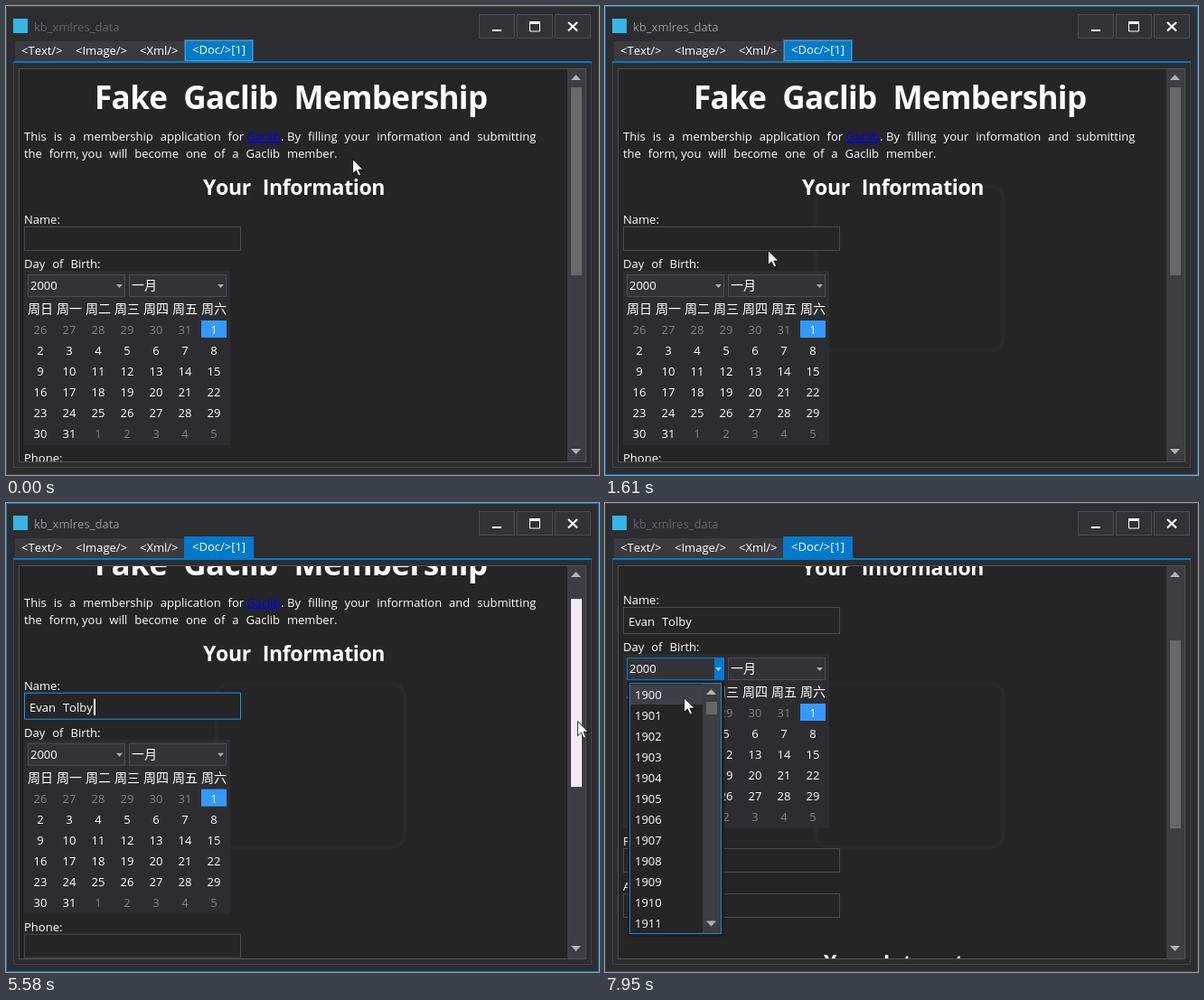
These frames come from a looping animation (656 by 519 pixels, 7990 ms). An HTML page:

```html
<!DOCTYPE html>
<html lang="en">
<head>
<meta charset="utf-8">
<title>Membership form</title>
<style>
  html, body { margin: 0; width: 100%; height: 100%; overflow: hidden; background: #2d2d30; }
  svg { display: block; color: #fff; font: 13px "Open Sans", "Noto Sans CJK SC", "Noto Sans CJK", sans-serif; font-kerning: none; }
  text { fill: #fff; }
  .live { fill: currentColor; }
  .arrow { fill: currentColor; opacity: .6; }
  .button { fill: #333337; stroke: #4c4c51; }
  .field { fill: #252526; stroke: #4c4c50; }
  .doc { word-spacing: 4.6px; }
  .h1 { font-size: 35px; font-weight: 700; letter-spacing: -.6px; word-spacing: 9.4px; }
  .h2 { font-size: 23px; font-weight: 700; letter-spacing: -.35px; word-spacing: 7.4px; }
  .link { fill: #00f; text-decoration: underline; }
  .cjk { font-family: "Noto Sans CJK SC", "Noto Sans CJK", sans-serif; font-size: 14px; }
  .mid { text-anchor: middle; }
  .other { fill: #828284; }
  .dialog text { fill: #111; }
  .thumb, .bar { fill: #686868; }
</style>
</head>
<body>
<svg width="656" height="519" viewBox="0 0 656 519">
  <defs>
    <clipPath id="view"><rect x="15" y="70" width="606" height="434"/></clipPath>
  </defs>

  <!-- window -->
  <rect width="656" height="519" fill="#2d2d30"/>
  <rect x=".5" y=".5" width="655" height="518" fill="none" stroke="#434347"/>
  <rect class="active" x=".5" y=".5" width="655" height="518" fill="none" stroke="#007acc"/>
  <rect x="8" y="14" width="16" height="16" fill="#35b5e5"/>
  <text class="title" x="31" y="28">kb_xmlres_data</text>
  <rect class="button" x="523.5" y="9.5" width="39" height="26"/>
  <rect class="button" x="565.5" y="9.5" width="39" height="26"/>
  <rect class="button" x="607.5" y="9.5" width="39" height="26"/>
  <rect class="live" x="538" y="26" width="10" height="2"/>
  <path d="M579.5 18v10h11V18z" fill="none" stroke="currentColor"/>
  <rect class="live" x="579" y="17" width="12" height="3"/>
  <path d="M622 18l10 9.500M632 18l-10 9.500" stroke="currentColor" stroke-width="2.200"/>

  <!-- tabs -->
  <rect x="10" y="39" width="188" height="22" fill="#3b3b3f"/>
  <rect x="197" y="37" width="77" height="25" fill="#007acc"/>
  <rect class="tabFocus" x="198.500" y="38.500" width="74" height="22" fill="none" stroke="#ff9a3c" stroke-dasharray="1 1"/>
  <text class="live" x="17" y="54">&lt;Text/&gt;</text>
  <text class="live" x="77" y="54">&lt;Image/&gt;</text>
  <text class="live" x="148" y="54">&lt;Xml/&gt;</text>
  <text class="live" x="206" y="53">&lt;Doc/&gt;[1]</text>
  <rect x="8.500" y="62.500" width="639" height="448" fill="none" stroke="#434347"/>
  <rect x="8" y="61" width="640" height="2" fill="#007acc"/>
  <rect x="14.500" y="69.500" width="627" height="435" fill="#252526" stroke="#505054"/>
  <rect class="ghost" x="233" y="200" width="208" height="181" rx="14" fill="none" stroke="#29292b" stroke-width="4"/>

  <!-- document -->
  <g clip-path="url(#view)">
    <g class="doc">
      <text class="h1" x="98" y="114">Fake Gaclib Membership</text>
      <text x="20" y="149">This is a membership application for</text>
      <text class="link" x="266" y="149">Gaclib</text>
      <text x="304" y="149">.</text>
      <text x="311" y="149">By filling your information and submitting</text>
      <text x="20" y="168">the form,</text>
      <text x="84" y="168">you will become one of a Gaclib member.</text>
      <text class="h2" x="218" y="209">Your Information</text>
      <text x="20" y="241">Name:</text>
      <rect class="field nameBox" x="20.500" y="244.500" width="239" height="26"/>
      <text x="26" y="265">Evan Tolby</text>
      <g class="pen">
        <rect x="26" y="250" width="160" height="20" fill="#252526"/>
        <rect class="caret" x="26" y="251" width="2" height="18" fill="#fff"/>
      </g>
      <g class="below">
        <text x="20" y="290">Day of Birth:</text>
        <rect x="20" y="293" width="228" height="193" fill="#2d2d30"/>
        <rect class="button" x="24.500" y="297.500" width="107" height="24"/>
        <rect class="button" x="136.500" y="297.500" width="107" height="24"/>
        <g class="hot">
          <rect x="24.500" y="297.500" width="107" height="24" fill="none" stroke="#007acc"/>
          <rect x="121" y="298" width="10" height="23" fill="#007acc"/>
        </g>
        <text class="live" x="27" y="314">2000</text>
        <text class="live cjk" x="139" y="314">一月</text>
        <path class="arrow" d="M122 308h7l-3.500 4zM234 308h7l-3.500 4z"/>
        <rect class="hover" x="24" y="348" width="28" height="19" fill="#3f3f46"/>
        <rect class="picked" x="216" y="348" width="28" height="19" fill="#39f"/>
        <g id="calendar" class="mid"></g>
        <text x="20" y="505">Phone:</text>
        <rect class="field" x="20.500" y="508.500" width="239" height="26"/>
        <text x="20" y="555">Address:</text>
        <rect class="field" x="20.500" y="558.500" width="239" height="26"/>
        <text class="h2" x="242" y="643">Your Interest</text>
      </g>
    </g>
  </g>

  <!-- scroll bar -->
  <rect x="621" y="70" width="20" height="434" fill="#3e3e42"/>
  <path class="arrow" d="M625 82h11l-5.500-6zM625 490h11l-5.500 6z"/>
  <rect class="thumb" x="625" y="90" width="12" height="208"/>

  <!-- message box -->
  <g class="dialog">
    <rect x="231" y="198" width="212" height="185" rx="15" fill="#000" opacity=".2"/>
    <rect x="245" y="211" width="180" height="153" fill="#fff"/>
    <rect x="245" y="312" width="180" height="52" fill="#f0f0f0"/>
    <text x="253" y="230" font-size="12.500">You clicked a hyperlink!</text>
    <path d="M404.500 220.500l10 10m0-10l-10 10" stroke="#222" stroke-width="1.200"/>
    <text x="257" y="280" font-size="11.500">http://www.gaclib.net/</text>
    <rect x="320" y="324" width="85" height="27" fill="#e1e1e1" stroke="#666" stroke-width="2"/>
    <text class="cjk mid" x="362" y="341" style="font-size:11px">确定</text>
  </g>

  <!-- year list -->
  <g class="popup">
    <rect x="25" y="197" width="107" height="283" fill="#1f1f21"/>
    <rect x="27.500" y="199.500" width="101" height="277" fill="#252526" stroke="#1c86d1"/>
    <rect class="yearHover" x="28" y="201" width="80" height="22" fill="#3f3f46"/>
    <rect x="108" y="200" width="20" height="276" fill="#3e3e42"/>
    <path class="arrow" d="M112 212h11l-5.500-6zM112 462.500h11l-5.500 6z"/>
    <rect class="bar" x="112" y="220" width="12" height="14"/>
    <g id="years"></g>
  </g>

  <path class="cursor" d="M.5 .5v16l3.800-3.500 2.700 6 2.500-1.200-2.600-5.700h5z" fill="#fff" stroke="#000" stroke-width=".8"/>
</svg>

<script>
const LOOP = 7990;

const addText = (parent, x, y, content, cls = '') => {
  const el = document.createElementNS('http://www.w3.org/2000/svg', 'text');
  el.setAttribute('x', x);
  el.setAttribute('y', y);
  el.setAttribute('class', cls);
  el.textContent = content;
  parent.append(el);
};

const calendar = document.getElementById('calendar');
[...'日一二三四五六'].forEach((d, i) => addText(calendar, 38 + 32 * i, 340, '周' + d, 'cjk'));
for (let i = 0; i < 42; i++) {
  const n = i - 5;
  const inMonth = n >= 1 && n <= 31;
  addText(calendar, 38 + 32 * (i % 7), 363 + 23 * Math.floor(i / 7),
    n < 1 ? n + 31 : n > 31 ? n - 31 : n, inMonth ? '' : 'other');
}
const years = document.getElementById('years');
for (let i = 0; i < 12; i++) addText(years, 33, 217 + 23 * i, 1900 + i);

// keys: [ms, value] pairs; hard changes jump instead of easing
const animate = (selector, prop, keys, easing = 'linear') => {
  const frames = [...keys, [LOOP, keys[keys.length - 1][1]]]
    .map(([ms, value]) => ({ offset: ms / LOOP, [prop]: value, easing }));
  document.querySelectorAll(selector).forEach(el =>
    el.animate(frames, { duration: LOOP, iterations: Infinity }));
};
const jump = (selector, prop, keys) => animate(selector, prop, keys, 'step-end');
const move = (x, y) => `translate(${x}px, ${y}px)`;
const path = points => points.map(([ms, x, y]) => [ms, move(x, y)]);
// value b between two times, a elsewhere, with fades of the given length
const during = (start, end, a, b, fade = 120) =>
  [[0, a], [start, a], [start + fade, b], [end, b], [end + fade, a]];

animate('.cursor', 'transform', path([
  [0, 383, 169], [30, 383, 169], [190, 295, 145], [800, 295, 145],
  [1200, 365, 333], [1320, 365, 333], [1610, 180, 270], [1850, 163, 243],
  [2100, 163, 243], [2210, 143, 242], [4620, 143, 242], [4860, 380, 285],
  [5080, 585, 313], [5240, 632, 225], [5420, 632, 225], [5580, 632, 241],
  [5900, 632, 287], [6010, 632, 287], [6200, 335, 308], [6500, 130, 283],
  [6690, 129, 282], [6930, 129, 282], [7200, 95, 182], [7780, 95, 182],
  [7940, 87, 215]
]));

// focus and enabled state
animate('.active', 'opacity', [
  [0, 0], [470, 0], [500, 1], [570, 1], [670, 0], [1300, 0], [1420, 1], [7340, 1], [7440, 0]
]);
animate('.title', 'fill', [
  [0, '#666'], [470, '#666'], [500, '#999'], [570, '#999'], [670, '#666'],
  [1300, '#666'], [1420, '#999'], [7340, '#999'], [7440, '#666']
]);
animate('svg', 'color', during(560, 1300, '#fff', '#6b6b6b'));
animate('.button', 'fill', during(560, 1300, '#333337', '#2d2d30'));
animate('.thumb, .picked', 'opacity', during(560, 1300, 1, 0));
jump('.tabFocus', 'opacity', [[0, 1], [1890, 0]]);
jump('.link', 'fill', [[0, '#00f'], [160, '#ff6a1a'], [1380, '#00f']]);
animate('.dialog', 'opacity', [[0, 0], [600, 0], [700, .72], [760, 1], [1300, 1], [1430, 0]]);
jump('.ghost', 'opacity', [[0, 0], [1400, 1]]);

// typing
jump('.nameBox', 'stroke', [[0, '#4c4c50'], [1890, '#1c97ea'], [7340, '#4c4c50']]);
jump('.nameBox', 'height', [[0, '26px'], [2720, '29px']]);
jump('.below', 'transform', [[0, move(0, 0)], [2720, move(0, 3)]]);
jump('.pen', 'transform', path([
  [0, 0, 0], [2720, 7.2, 0], [2870, 13.7, 0], [3010, 21, 0], [3200, 29.2, 0],
  [3710, 44.3, 0], [3870, 52.1, 0], [3970, 55.4, 0], [4060, 63.4, 0], [4160, 71, 0]
]));
jump('.caret', 'opacity', [
  [0, 0], [1890, 1], [2210, 0], [2720, 1], [3010, 0], [3710, 1], [4620, 0],
  [5130, 1], [5800, 0], [6300, 1], [6930, 0]
]);

// scrolling
animate('.doc', 'transform', path([[0, 0, 0], [5420, 0, 0], [5580, 0, -34], [5900, 0, -129]]));
animate('.thumb', 'transform', path([[0, 0, 0], [5420, 0, 0], [5580, 0, 16], [5900, 0, 62]]));
animate('.thumb', 'fill', during(5200, 6040, '#686868', '#efebef', 80));

// calendar and year list
const cell = (ms, col, row) => [ms, 32 * col, 23 * row];
jump('.hover', 'transform', path([
  [0, 0, 0], cell(6330, 6, 3), cell(6375, 5, 3), cell(6420, 4, 3), cell(6465, 3, 2),
  cell(6980, 3, 1), cell(7040, 2, 0)
]));
jump('.hover', 'opacity', [[0, 0], [6330, 1], [7080, 0]]);
jump('.hot', 'opacity', [[0, 0], [7160, 1]]);
animate('.popup', 'opacity', [[0, 0], [7340, 0], [7420, 1]]);
jump('.yearHover', 'opacity', [[0, 0], [7860, 1]]);
</script>
</body>
</html>
```
